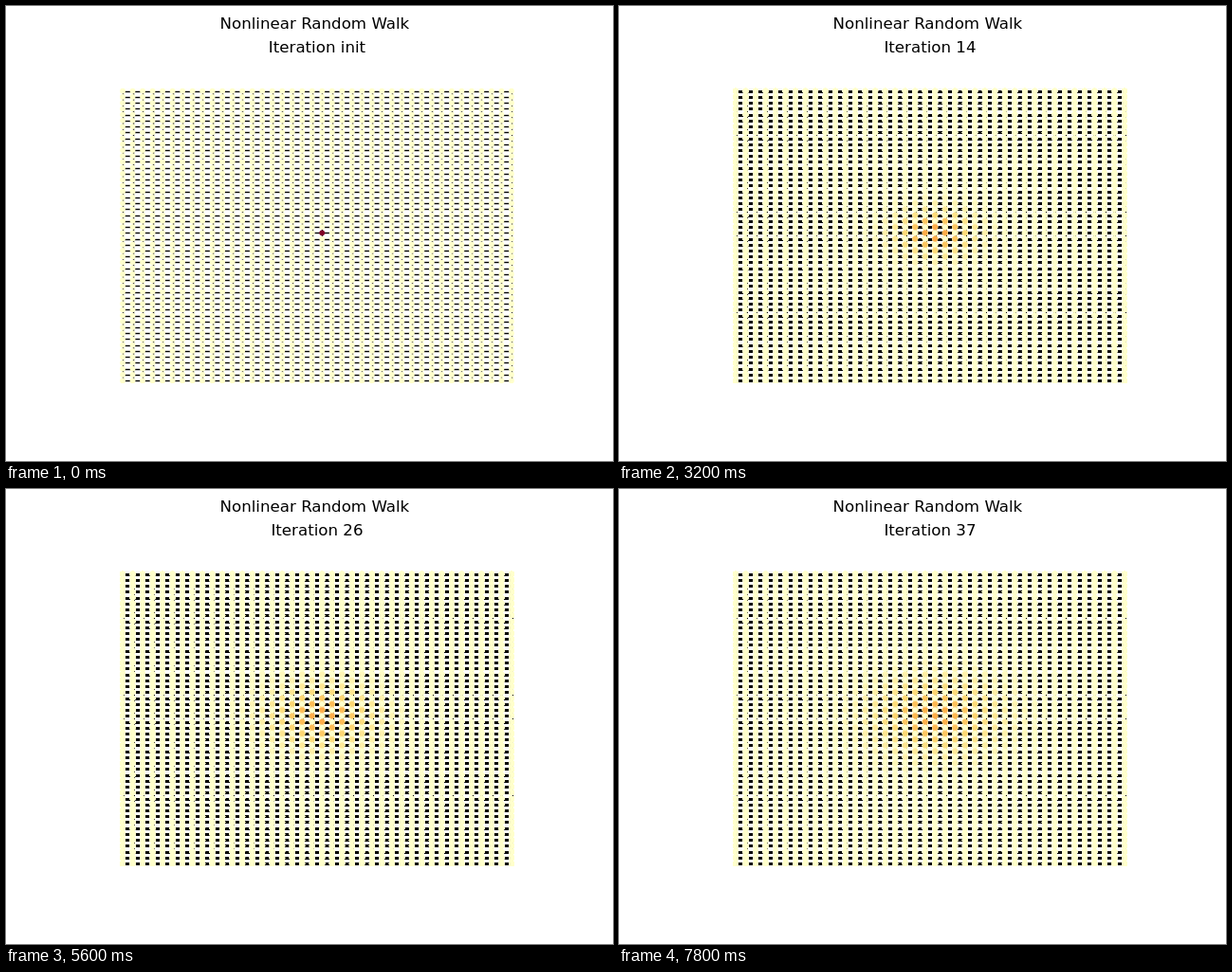
An HTML page with a canvas for the animation above (8000 ms loop, 640 by 480 pixels).

```html
<!DOCTYPE html>
<html lang="en">
<head>
<meta charset="utf-8">
<title>Nonlinear Random Walk</title>
<style>
  html, body { margin: 0; width: 100%; height: 100%; overflow: hidden; background: #fff; }
  canvas, svg { position: absolute; left: 0; top: 0; width: 640px; height: 480px; }
  text { font: 16.667px "DejaVu Sans", sans-serif; text-anchor: middle; fill: #000; }
</style>
</head>
<body>
<canvas id="edges" width="640" height="480"></canvas>
<canvas id="nodes" width="640" height="480"></canvas>
<svg viewBox="0 0 640 480">
  <text x="325.4" y="24">Nonlinear Random Walk</text>
  <text id="label" x="328" y="49"></text>
</svg>
<script>
const COLS = 40, ROWS = 50, HOME = { col: 20, row: 25 };
const LEFT = 123.04, BOTTOM = 395.13, WIDTH = 409.92, HEIGHT = 305.45;
const RADIUS = 2.89, LINE = 1.389;
const STEP_MS = 200, FRAMES = 40, PEAK = 0.4;

const RAMP = ['ffffcc', 'ffeda0', 'fed976', 'feb24c', 'fd8d3c', 'fc4e2a', 'e31a1c', 'bd0026', '800026']
  .map(hex => [0, 2, 4].map(i => parseInt(hex.slice(i, i + 2), 16)));

const edges = document.getElementById('edges').getContext('2d');
const nodes = document.getElementById('nodes').getContext('2d');
const label = document.getElementById('label');

const nodeX = col => LEFT + WIDTH * col / (COLS - 1);
const nodeY = row => BOTTOM - HEIGHT * row / (ROWS - 1);
const snap = v => Math.round(v) + 0.5;

function ramp(v) {
  const pos = v * (RAMP.length - 1);
  const i = Math.min(Math.floor(pos), RAMP.length - 2);
  const mix = RAMP[i].map((c, k) => Math.round(c + (RAMP[i + 1][k] - c) * (pos - i)));
  return `rgb(${mix})`;
}

// Binomial weights after n steps, scaled so that the largest is 1.
function binomial(n) {
  const w = [1];
  for (let k = 1; k <= n; k++) w.push(w[k - 1] * (n - k + 1) / k);
  const top = Math.max(...w);
  return w.map(v => v / top);
}

// A 2D lattice walk is two independent 1D walks along the diagonals.
function density(n) {
  const w = binomial(n);
  const along = d => (n + d) % 2 ? 0 : w[(n + d) / 2] || 0;
  return (dx, dy) => along(dx + dy) * along(dx - dy);
}

function drawEdges() {
  for (let row = 0; row < ROWS; row++)
    edges.fillRect(LEFT, snap(nodeY(row)) - LINE / 2, WIDTH, LINE);
  for (let col = 0; col < COLS; col++)
    edges.fillRect(snap(nodeX(col)) - LINE / 2, BOTTOM - HEIGHT, LINE, HEIGHT);
}

function drawNodes(n) {
  const p = density(n), scale = n ? PEAK : 1;
  for (let col = 0; col < COLS; col++) {
    for (let row = 0; row < ROWS; row++) {
      nodes.fillStyle = ramp(scale * p(col - HOME.col, row - HOME.row));
      nodes.beginPath();
      nodes.arc(nodeX(col), nodeY(row), RADIUS, 0, 2 * Math.PI);
      nodes.fill();
    }
  }
}

// Every step paints over the earlier ones, so soft outlines slowly harden.
let drawn = -1;
function show(frame) {
  if (frame === drawn) return;
  if (frame < drawn) {
    for (const ctx of [edges, nodes]) ctx.clearRect(0, 0, 640, 480);
    drawn = -1;
  }
  while (drawn < frame) {
    drawn++;
    drawEdges();
    drawNodes(Math.max(0, drawn - 1));
  }
  label.textContent = 'Iteration ' + (frame < 2 ? 'init' : frame - 2);
}

let start;
function tick(now) {
  start ??= now;
  show(Math.floor((now - start) / STEP_MS) % FRAMES);
  requestAnimationFrame(tick);
}
show(0);
requestAnimationFrame(tick);
</script>
</body>
</html>
```
